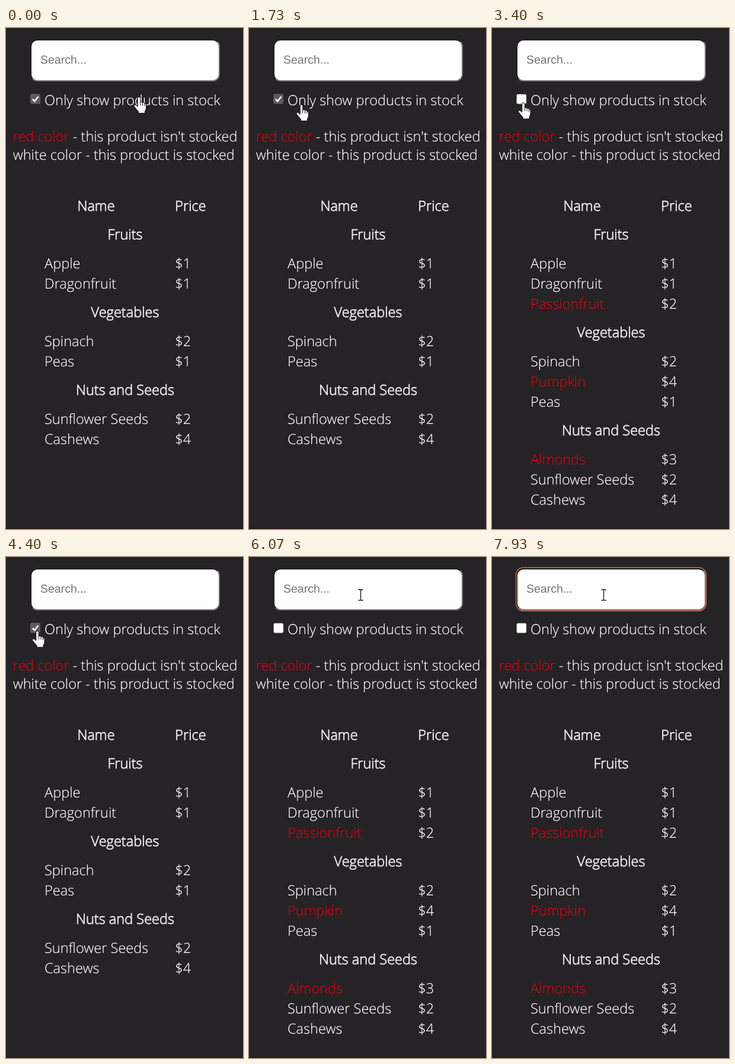
Write an HTML page that moves like this. It is 400 px wide and 844 px high and loops after 8000 ms.

```html
<!DOCTYPE html>
<html lang="en">
<head>
<meta charset="utf-8">
<title>Product table</title>
<style>
  html, body { margin: 0; width: 100%; height: 100%; overflow: hidden; background: #252326; }
  #search {
    position: absolute; left: 41px; top: 19px; width: 320px; height: 71px; box-sizing: border-box;
    border: 2px inset #767676; border-radius: 12px; background: #fff;
  }
  svg { position: absolute; left: 0; top: 0; display: block; }
  text {
    font: 300 23.55px "Open Sans", sans-serif; white-space: pre; text-rendering: geometricPrecision;
    fill: #fff; stroke: #fff; stroke-width: .2px;
  }
  .red { fill: #dc0010; stroke: #dc0010; }
  .head { text-anchor: middle; fill: #ebebeb; stroke: #ebebeb; stroke-width: .85px; }
  .placeholder { font: 19.5px "Liberation Sans", Arial, sans-serif; fill: #757575; stroke: none; }
</style>
</head>
<body>
<div id="search"></div>
<svg width="400" height="844" viewBox="0 0 400 844">
  <rect y="842" width="400" height="2" fill="#211a20"/>
  <text class="placeholder" x="58" y="60">Search...</text>
  <g id="focus">
    <rect x="40.6" y="17.8" width="320.9" height="73" rx="12.5" fill="none" stroke="#d4693f" stroke-width="1.4"/>
    <rect id="caret" x="58" y="42" width="1" height="23" fill="#000"/>
  </g>

  <g id="checked">
    <rect x="41" y="111" width="17" height="17" rx="3" fill="#5d5b5e"/>
    <path d="M44.7 119.8l3.5 3.6 6.3-8" fill="none" stroke="#fff" stroke-width="2.5"/>
  </g>
  <rect id="unchecked" x="41.5" y="111.5" width="16.5" height="16.5" rx="2.5" fill="#fff" stroke="#767676" stroke-width=".8"/>
  <text x="65" y="130">Only show products in stock</text>

  <text x="11.7" y="191"><tspan class="red">red color</tspan> - this product isn't stocked</text>
  <text x="11.7" y="222">white color - this product is stocked</text>

  <text class="head" x="152" y="308">Name</text>
  <text class="head" x="311.5" y="308">Price</text>
  <g id="stocked"></g>
  <g id="all"></g>

  <path id="hand" fill="#fff" stroke="#111" stroke-width="1" stroke-linejoin="round"
    d="M-2.3 2Q-2.3-.3 0-.3T2.3 2V9Q2.8 7.8 4.3 8T6 9.8Q7 8.8 8.3 9.3T9.5 11Q11.8 10.3 12 13V18Q12 21 10 23.5V27H-1V24Q-4.5 20.5-8.2 15.5Q-9 13.3-7 12.7Q-5 12.7-2.3 16Z
       M2.3 9V14M6 10V14.5M9.5 11V15"/>
  <path id="beam" fill="none" stroke="#111" stroke-width="1.3"
    d="M-4-9H-1.5Q0-9 0-7.5Q0-9 1.5-9H4M0-8V8M-4 9H-1.5Q0 9 0 7.5Q0 9 1.5 9H4"/>
</svg>
<script>
const LOOP = 8000, UNCHECK = 2250, RECHECK = 3850, UNCHECK_AGAIN = 4900, FOCUS = 6400, BLINK = 500;
const $ = id => document.getElementById(id);
const show = (id, on) => $(id).style.display = on ? '' : 'none';

// A leading "!" marks a product that is out of stock.
const catalog = {
  'Fruits': ['Apple $1', 'Dragonfruit $1', '!Passionfruit $2'],
  'Vegetables': ['Spinach $2', '!Pumpkin $4', 'Peas $1'],
  'Nuts and Seeds': ['!Almonds $3', 'Sunflower Seeds $2', 'Cashews $4']
};

function addText(parent, x, y, content, style = '') {
  const node = document.createElementNS('http://www.w3.org/2000/svg', 'text');
  node.setAttribute('x', x);
  node.setAttribute('y', y);
  node.setAttribute('class', style);
  node.textContent = content;
  parent.append(node);
}

function buildTable(parent, stockedOnly) {
  let y = 356;
  for (const [category, products] of Object.entries(catalog)) {
    addText(parent, 201, y, category, 'head');
    y += 49;
    for (const product of products) {
      const missing = product[0] === '!';
      if (missing && stockedOnly) continue;
      const [name, price] = product.replace('!', '').split(' $');
      addText(parent, 65, y, name, missing ? 'red' : '');
      addText(parent, 285.2, y, '$' + price);
      y += 34;
    }
    y += 14;
  }
}

// Pointer hot spot: time, x, y
const route = [
  [0, 224.5, 116.5], [350, 221, 119], [730, 215, 123], [950, 212, 124],
  [1730, 88.5, 129.5], [2080, 53, 126], [3400, 53, 126], [4000, 53, 125],
  [5250, 53, 125], [5850, 188.5, 64], [LOOP, 188.5, 64]
];

function pointerAt(t) {
  const i = route.findIndex(point => point[0] > t);
  const [t0, x0, y0] = route[i - 1], [t1, x1, y1] = route[i];
  const k = (t - t0) / (t1 - t0), eased = k * k * (3 - 2 * k);
  return [x0 + (x1 - x0) * eased, y0 + (y1 - y0) * eased];
}

function draw(now) {
  const t = now % LOOP;
  const checked = t < UNCHECK || (t >= RECHECK && t < UNCHECK_AGAIN);
  show('checked', checked);
  show('stocked', checked);
  show('unchecked', !checked);
  show('all', !checked);
  show('focus', t >= FOCUS);
  show('caret', Math.floor((t - FOCUS) / BLINK) % 2 === 0);

  const [x, y] = pointerAt(t), overInput = y < 90;
  show('hand', !overInput);
  show('beam', overInput);
  $(overInput ? 'beam' : 'hand').setAttribute('transform', `translate(${x} ${y})`);
  requestAnimationFrame(frame);
}

const start = performance.now();
const frame = () => draw(performance.now() - start);
buildTable($('stocked'), true);
buildTable($('all'), false);
draw(0);
</script>
</body>
</html>
```
